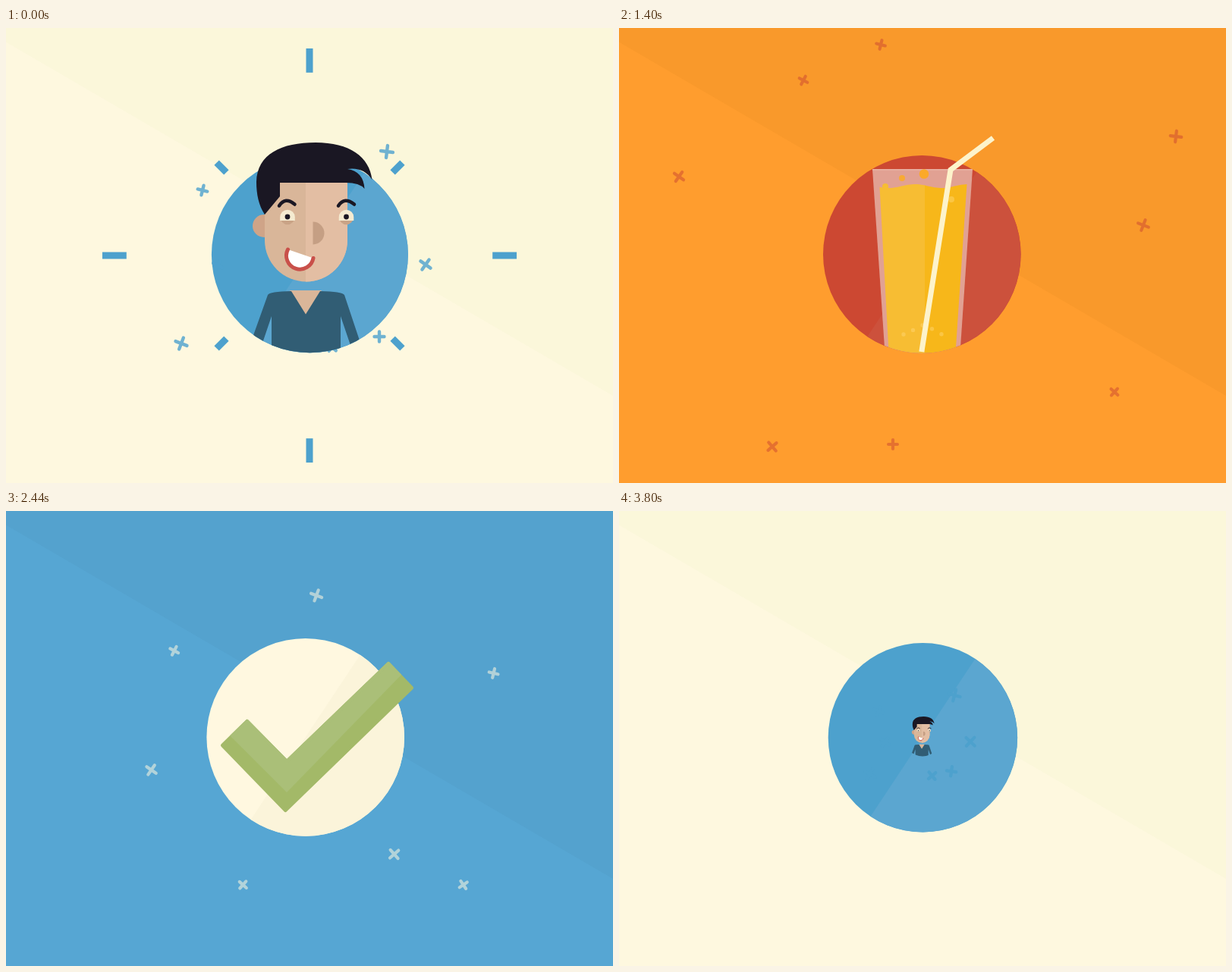
An HTML page with a canvas that plays this animation: 800x600 px, repeating every 3.84 s.

```html
<!DOCTYPE html>
<html lang="en">
<head>
<meta charset="utf-8">
<title>Badges</title>
<style>
  html, body { margin: 0; width: 100%; height: 100%; overflow: hidden; }
  canvas { display: block; }
</style>
</head>
<body>
<canvas id="stage" width="800" height="600"></canvas>
<script>
const ctx = document.getElementById('stage').getContext('2d');
const LOOP = 3840, STEP = 40, TAU = Math.PI * 2;

const clamp = v => Math.min(1, Math.max(0, v));
const easeOut = (v, power = 3) => 1 - (1 - clamp(v)) ** power;
const pop = (p, start) => easeOut((p - start) / 223);

// Each cross flies outward from the centre and passes its key point at phase `at`
const face = {
  back: ['#fef8df', '#fbf7da'], disc: ['#4da1cd', '#5ba6d0'],
  x: 400.4, y: 298.8, r: 129.5, icon: drawFace, at: 520,
  crosses: [[492, 407], [502, 163], [259, 214], [231, 416], [279, 313], [553, 312], [430, 421]]
};
const juice = {
  back: ['#ff9d2e', '#f9992b'], disc: ['#cc4832', '#cc513c'],
  x: 399.3, y: 298.4, r: 130.3, icon: drawJuice, at: 800,
  crosses: [[361, 549], [734, 143], [345, 22], [691, 260], [243, 69], [79, 196], [653, 480], [202, 552]]
};
const check = {
  back: ['#56a6d3', '#54a2ce'], disc: ['#fff8e0', '#fbf4da'],
  x: 394.7, y: 298.4, r: 130.3, icon: drawCheck, at: 1240,
  crosses: [[830, 150], [420, -30], [91, 98], [38, 374], [250, 640], [600, 569], [760, 640]]
};

function sceneAt(t) {
  if (t < 600) return [face, t + 520];
  if (t < 1720) return [juice, t - 600];
  if (t < 3560) return [check, Math.min(t, 2920) - 1680];
  return [face, t - 3560];
}

function fill(path, color) {
  ctx.fillStyle = color;
  ctx.fill(typeof path === 'string' ? new Path2D(path) : path);
}

function line(path, color, width, cap = 'round') {
  ctx.strokeStyle = color;
  ctx.lineWidth = width;
  ctx.lineCap = cap;
  ctx.stroke(new Path2D(path));
}

function dot(x, y, r, color, from = 0, to = TAU) {
  const path = new Path2D();
  path.arc(x, y, r, from, to);
  fill(path, color);
}

function scaled(x, y, scale, draw) {
  if (scale <= 0) return;
  ctx.save();
  ctx.translate(x, y);
  ctx.scale(scale, scale);
  ctx.translate(-x, -y);
  draw();
  ctx.restore();
}

function clipDisc({ x, y, r }) {
  ctx.beginPath();
  ctx.arc(x, y, r, 0, TAU);
  ctx.clip();
}

function drawDashes(p, color) {
  ctx.fillStyle = color;
  for (let i = 0; i < 8; i++) {
    const diagonal = i % 2;
    const q = diagonal ? (p - 390) / 300 : (p - 370) / 320;
    if (q <= 0 || q >= 1) continue;
    const radius = diagonal ? 141.3 + 52.5 * q : 112 + 228 * easeOut(q, 1.6);
    const length = (diagonal ? 18.5 : 32) * Math.sin(Math.PI * q);
    ctx.save();
    ctx.translate(400, 300);
    ctx.rotate(i * Math.PI / 4);
    ctx.fillRect(radius - length / 2, -4.5, length, 9);
    ctx.restore();
  }
}

function drawCrosses(p, { crosses, at, disc, x: cx, y: cy }) {
  if (p < 200) return;
  const reach = (p / at) ** 1.15;
  const size = 1 - (p - 480) ** 2 / 1.6e6;
  crosses.forEach(([x, y], i) => {
    const arm = (8.5 + i % 2 * 1.5) * size - 2;
    ctx.save();
    ctx.globalAlpha = clamp((1270 - p) / 930);
    ctx.translate(cx + (x - cx) * reach, cy + (y - cy) * reach);
    ctx.rotate((7 * i + (at - p) / 35) * Math.PI / 180);
    line(`M${-arm} 0H${arm}M0 ${-arm}V${arm}`, disc[0], 4.4 * size);
    ctx.restore();
  });
}

function drawEye(x) {
  dot(x, 250, 9.2, '#c9a386', 0, Math.PI);
  fill(`M${x - 9.8} 254V249.5a9.8 9.8 0 0 1 19.6 0V254Z`, '#f5ebd1');
  dot(x, 249, 3.4, '#1a1723');
}

function drawFace(p) {
  scaled(400, 299, pop(p, 225), () => {
    ctx.save();
    clipDisc(face);
    fill('M374 346H416L395 379Z', '#dab699');
    fill('M345 352Q347 347.5 376 347L395 377.5L414 347Q443 347.5 446 352L474 436H460L441 380V436H350V380L331 436H315Z', '#315d74');
    ctx.restore();

    dot(340, 261, 15, '#cfa488');
    fill('M341 204H450V280A54.5 54.5 0 0 1 341 280Z', '#d9b699');
    fill('M395 204H450V280A54.5 54.5 0 0 1 395 334.5Z', '#e3bea3');
    fill('M341 246C333 234 330 219 330 203C331 166 363 151 408 151C453 151 479 170 482.5 200Q471 183 450 186Q471 189 472.5 212Q466 204 448 204H361V222Z', '#1a1723');
    drawEye(371);
    drawEye(448.5);
    line('M360 234.5Q368 222 380.5 232.5M438 234.5Q446 222 459 232.5', '#1a1723', 4.5);
    dot(404.5, 270.5, 15, '#c59f84', -Math.PI / 2, Math.PI / 2);

    const mouth = 'M371.5 292A17.9 17.9 0 1 0 405 303.5';
    fill(mouth + 'Z', '#fff');
    line(mouth, '#c9504a', 5);
  });
}

function drawJuice(p) {
  scaled(400, 427, pop(p, 225), () => {
    clipDisc(juice);
    fill('M334 186H466L449 436H351Z', '#e1a193');
    fill('M334 186H466V187.5H334Z', '#e9b3a6');

    const fall = ((p - 800) / 40) ** 2 * 0.3;
    dot(402, 192.5 + fall, 6.3, '#fba929');
    dot(373, 198 + fall, 4, '#f8aa35');
    dot(351, 209 + fall, 4, '#f7bd33');

    const liquid = new Path2D();
    for (let x = 343.5; x <= 458.5; x += 2.5)
      liquid.lineTo(x, 208.5 - 2.5 * Math.cos(TAU * (x - 390) / 70 - (p - 800) / 120));
    liquid.lineTo(443, 436);
    liquid.lineTo(356, 436);
    ctx.save();
    ctx.clip(liquid);
    fill('M330 180H403V440H330Z', '#f7bd33');
    fill('M403 180H470V440H403Z', '#f7b71a');
    const rise = (p - 800) * 0.06;
    for (let i = 0; i < 5; i++)
      dot(375 + 12.5 * i, 398 + 6 * Math.cos(i * 1.5) - rise, 2.7, 'rgba(255,215,120,.45)');
    dot(438, 226 - rise, 4, 'rgba(255,215,120,.45)');
    ctx.restore();
  });
  scaled(400, 298, pop(p, 238), () =>
    line('M398.8 427L437 187L493 145', '#fdf3cb', 7, 'butt'));
}

function drawCheck(p) {
  scaled(410, 298, pop(p, 225), () => {
    ctx.lineJoin = 'round';
    const tick = 'M317.8 277.5L370 330.5L504 201.5L534.5 233.2L368.3 394.5L285.5 309Z';
    fill(tick, '#a3b968');
    line(tick, '#a3b968', 5);
    ctx.clip(new Path2D('M295 296L370 371L521 216L540 180H270Z'));
    fill(tick, '#aabf78');
    line(tick, '#aabf78', 5);
  });
}

function draw(t) {
  const [scene, p] = sceneAt(t);
  const { back, disc, x, y, r } = scene;
  fill('M0 0H800V600H0Z', back[0]);
  fill('M0 0H800V485L0 18.5Z', back[1]);
  drawDashes(p, disc[0]);

  const radius = r * easeOut((p - 80) / 240);
  dot(x, y, radius, disc[0]);
  dot(x, y, radius, disc[1], -0.985, Math.PI - 0.985);
  drawCrosses(p, scene);
  ctx.lineJoin = 'miter';
  scene.icon(p);
}

function tick(now) {
  draw(Math.floor(now % LOOP / STEP) * STEP);
  requestAnimationFrame(tick);
}
tick(0);
</script>
</body>
</html>
```
